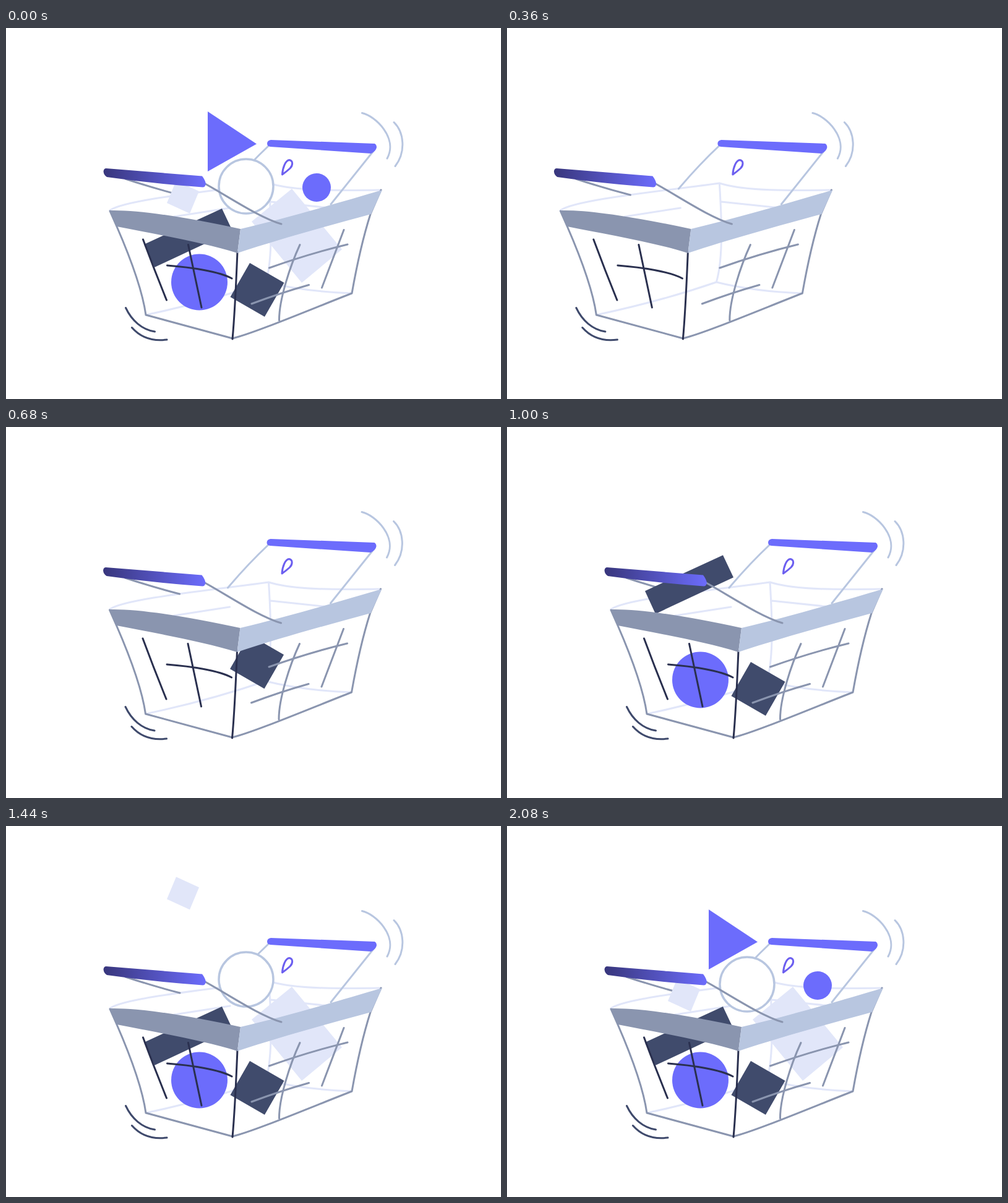
An HTML page for the animation above (3040 ms loop, 800 px wide and 600 px high).

```html
<!DOCTYPE html>
<html lang="en">
<head>
<meta charset="utf-8">
<title>Shopping basket</title>
<style>
html, body { margin: 0; width: 100%; height: 100%; overflow: hidden; background: #fff; }
svg { display: block; width: 800px; height: 600px; }
.line { fill: none; stroke-width: 3; stroke-linecap: round; stroke-linejoin: round; }
.pale { stroke: #e1e6f9; }
.sky { stroke: #b8c6e0; }
.grey { stroke: #8a95af; }
.navy { stroke: #3f4a6c; }
.ink { stroke: #2a304f; }
</style>
</head>
<body>
<svg viewBox="0 0 800 600">
  <defs>
    <linearGradient id="grip">
      <stop offset="0" stop-color="#38367c"/>
      <stop offset="1" stop-color="#6c6cfc"/>
    </linearGradient>
  </defs>
  <g id="basket">
    <!-- back wall, rear handle, motion arcs -->
    <path class="line pale" d="M168 295C190 278 330 264 425 251C465 264 540 263 606 262M425 251C428 300 432 370 420 411M226 464Q330 442 420 411Q480 426 558 429M272 305L362 291M428 281L523 291"/>
    <path class="line sky" d="M425 190Q391 222 359 260M593 200L525 285M575.500 137.500C597 142 634 178 616 211M627 152.500C643 168 647 200 629 223.500"/>
    <path fill="#6c6cfc" d="M428 181L596 187Q599 189 599 193Q598 199 590 203L427 192Q422 191 422 187Q422 182 428 181Z"/>
    <path class="line" stroke="#6c5ff0" d="M446.500 237C447 226 452 213.500 458 213.500C464 214.500 464 222 459 227Q453 232.500 446.500 237Z"/>
    <path class="line grey" d="M193 244Q235 258 281 270"/>
    <path class="line navy" d="M193.500 452.500C203 473 220 488 240.500 491M203.500 484.500C218 501 237 507 260 504"/>

    <g class="items">
      <path fill="#404b6c" d="M394 380L449.500 412L418 467L362.500 435Z"/>
      <circle fill="#6c6cfc" cx="312.500" cy="411" r="45.500"/>
      <path fill="#404b6c" d="M349 292L366 328L240 387L223 350Z"/>
      <path fill="#e1e6f9" d="M462 260L543 358L478 412L397 313Z"/>
      <circle fill="#fff" stroke="#b8c6e0" stroke-width="3.500" cx="388" cy="256" r="44"/>
      <path fill="#e1e6f9" d="M275 247L312 264L297 300L260 283Z"/>
      <circle fill="#6c6cfc" cx="502" cy="258" r="23"/>
      <path fill="#6c6cfc" d="M326 135L405 187.500L326 232Z"/>
    </g>

    <!-- front walls, rim, front handle -->
    <path class="line grey" d="M168 296L179 321C202 374 221 428 226 464L366 502C400 494 490 456 559 429C565 395 575 345 589 301L606 262M546 326.500L510.500 420M552 350Q490 365 425.500 388M475 350.500C459 385 441 440 441.500 473M489.500 415.500Q445 428 397 446"/>
    <path class="line ink" d="M221.500 342Q240 392 259.500 440M294.500 350.500L316 452M260.500 384C300 387 345 394 365 405M374 362C372 410 370 460 366 503"/>
    <path fill="#8a95af" d="M167 295Q230 293 379 325L374 364C320 347 240 333 179 321Z"/>
    <path fill="#b8c6e0" d="M379 325C450 308 530 285 608 262L590 301C520 320 440 342 374 364Z"/>
    <path class="line grey" d="M322 252C360 273 410 307 445 317"/>
    <path fill="url(#grip)" d="M162 227L317 239.500Q322 246 323 252Q322 257.500 318 257.500Q240 252 163 241Q158 238 157.500 232Q158 227 162 227Z"/>
  </g>
</svg>
<script>
const LOOP = 3040, FRAME = 40;
const SLIDE = { start: 34, end: 802, width: 744 };
// Landing time of each item, in drawing order, and how steeply it falls.
const LANDINGS = [863, 1085, 1216, 1380, 1547, 1695, 1865, 2095];
const steepness = i => i === 4 ? .0157 : .01405;

const full = document.getElementById('basket');
const fresh = full.cloneNode(true);
fresh.removeAttribute('id');
full.after(fresh);
const items = [...fresh.querySelector('.items').children];

const move = (el, x, y) => el.setAttribute('transform', `translate(${x} ${y})`);
const clamp = v => Math.min(1, Math.max(0, v));

function draw(t) {
  const left = clamp((SLIDE.end - t) / (SLIDE.end - SLIDE.start)) ** 4;
  move(full, SLIDE.width * (1 - left), 0);
  move(fresh, -SLIDE.width * left, 0);
  items.forEach((item, i) => {
    const drop = (Math.max(0, LANDINGS[i] - t) * steepness(i)) ** 4;
    move(item, 0, -Math.min(drop, 900));
  });
}

const begin = performance.now();
function tick() {
  const t = (performance.now() - begin) % LOOP;
  draw(Math.floor(t / FRAME) * FRAME);
  requestAnimationFrame(tick);
}
tick();
</script>
</body>
</html>
```
